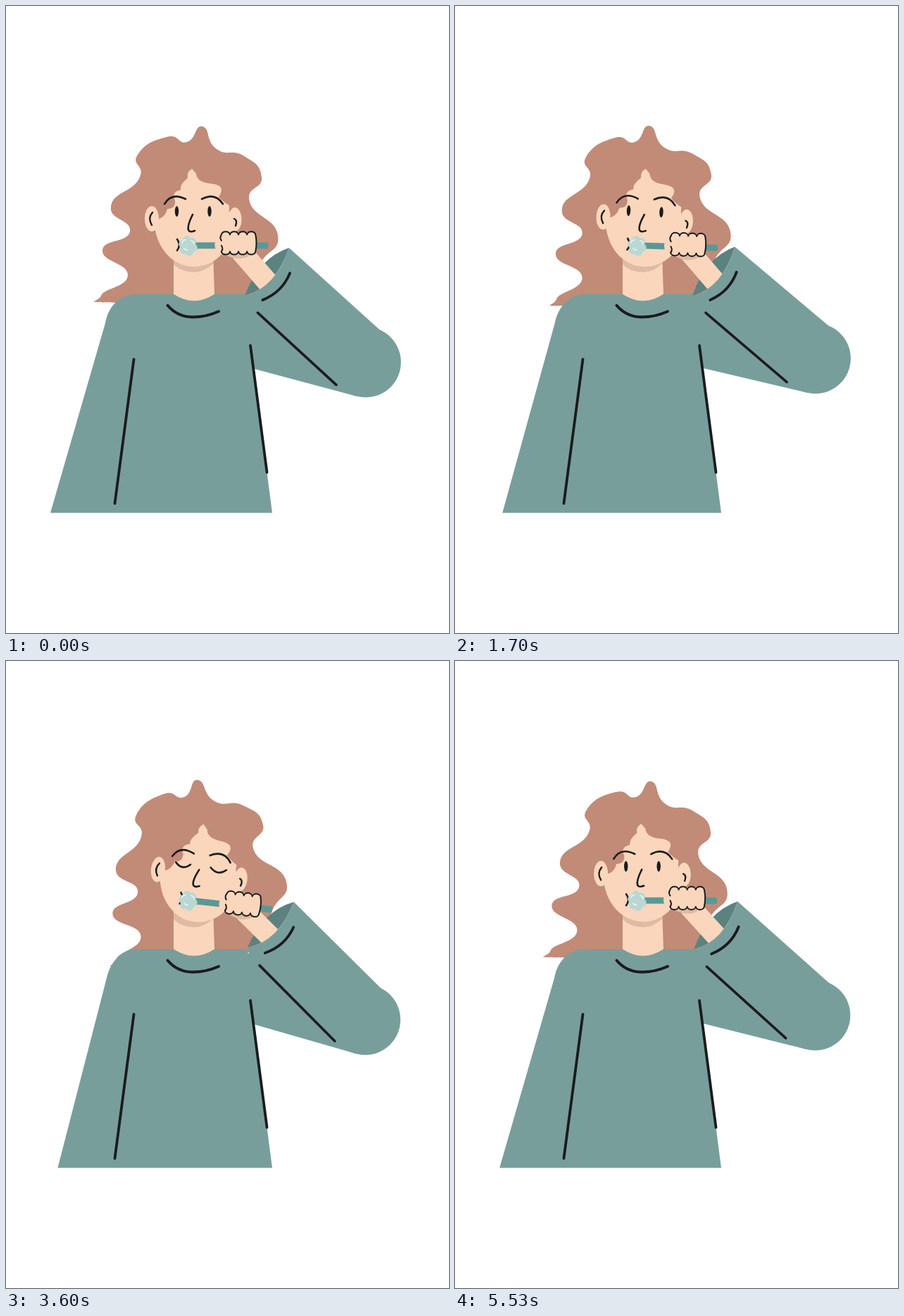
An HTML page with a canvas for the animation above (5610 ms loop, 629 px wide and 890 px high).

```html
<!DOCTYPE html>
<html lang="en">
<head>
<meta charset="utf-8">
<title>Brushing teeth</title>
<style>
  html, body { margin: 0; width: 100%; height: 100%; overflow: hidden; background: #fff; }
  canvas { display: block; }
</style>
</head>
<body>
<canvas id="stage" width="629" height="890"></canvas>
<script>
const ctx = document.getElementById('stage').getContext('2d');
const LOOP = 5610, CYCLE = 1400, TAU = 2 * Math.PI;
const INK = '#1b1b1d', HAIR = '#c18b78', SKIN = '#fad7bc', SHADE = '#dfbaa4',
      SHIRT = '#789e9c', CUFF = '#5c8280', BRUSH = '#5a9897', FOAM = '#b9d8d3', SHINE = '#e9f5f2';

// Crests and notches of the curls, clockwise from the lower left
const curls = [[160, 421], [135, 411], [173, 382], [137, 347], [176, 320], [149, 284], [189, 245],
  [187, 211], [228, 186], [257, 193], [279, 171], [299, 203], [338, 213], [363, 243], [346, 278],
  [386, 325], [360, 368], [345, 415]];

function fill(path, color) {
  ctx.fillStyle = color;
  ctx.fill(typeof path === 'string' ? new Path2D(path) : path);
}

function line(d, width, color = INK) {
  ctx.strokeStyle = color;
  ctx.lineWidth = width;
  ctx.stroke(new Path2D(d));
}

function oval(x, y, rx, ry, color) {
  const p = new Path2D();
  p.ellipse(x, y, rx, ry, 0, 0, TAU);
  fill(p, color);
}

function roundBox(x, y, w, h, r, color) {
  const p = new Path2D();
  p.roundRect(x, y, w, h, r);
  fill(p, color);
}

// Closed smooth curve through the points
function smooth(pts, bend) {
  const p = new Path2D(), at = i => pts[(i + pts.length) % pts.length];
  p.moveTo(...at(0));
  pts.forEach((b, i) => {
    const a = at(i - 1), c = at(i + 1), d = at(i + 2);
    p.bezierCurveTo(b[0] + (c[0] - a[0]) * bend, b[1] + (c[1] - a[1]) * bend,
                    c[0] - (d[0] - b[0]) * bend, c[1] - (d[1] - b[1]) * bend, ...c);
  });
  return p;
}
const hair = smooth(curls, .27);

function group(place, draw) {
  ctx.save();
  place();
  draw();
  ctx.restore();
}

function turn(x, y, deg, toX = x, toY = y) {
  ctx.translate(toX, toY);
  ctx.rotate(deg * Math.PI / 180);
  ctx.translate(-x, -y);
}

function drawHair(lean) {
  group(() => {
    ctx.translate(258, 226);
    ctx.transform(1, -.105 * lean, .125 * lean, 1, 0, 0);
    ctx.translate(-258, -226);
  }, () => fill(hair, HAIR));
}

function drawHead(closed) {
  oval(207, 302, 10, 18, SKIN);
  oval(325, 303, 9.5, 17, SKIN);
  fill('M210 304C212 345 238 370 267 370C297 370 322 345 325 304Q315 297 317 283' +
       'Q308 278 302 271Q314 254 290 252Q271 250 270 238L264 231Q256 236 258 244' +
       'Q246 254 248 261Q234 264 240 276Q241 288 229 288Q226 302 210 304Z', SKIN);
  line('M208 293Q201 301 207 311M324 302Q329 304 326 312', 2.4);
  line('M225 281Q235 264 255 274M278 274Q297 264 308 281', 2.6);
  line('M265 296Q257 312 259 318Q261 322 268 319', 2.6);
  line('M243 331Q249 339 243 347', 2.6);
  if (closed) {
    line('M231 289Q241 300 252 290M281 291Q292 302 303.5 292', 2.6);
  } else {
    oval(242.5, 291.5, 2.7, 7.5, INK);
    oval(289, 291.5, 2.7, 7.5, INK);
  }
}

function drawTorso(lean) {
  fill('M238 350L238 410L267 425L296 410L294 350Z', SKIN);
  fill('M238 358L294 358L294 366Q281 378 267 378Q250 378 238 367Z', SHADE);
  fill(`M238 409Q267 428 296 409H342L347 482L378 719.5H${63 + 11 * lean}L${141 + 2 * lean} 450` +
       `C${145 + 3 * lean} 428 ${160 + 4 * lean} 409 185 409Z`, SHIRT);
}

function drawArm(ex, ey, tilt, reach, hand) {
  const pitX = 353, pitY = 511 + 5 * reach;
  const forearm = () => turn(511, 506, tilt, ex, ey);

  // Upper arm ends on a tangent to the elbow circle
  const dx = ex - pitX, dy = ey - pitY, len = Math.hypot(dx, dy);
  const a = Math.atan2(dy, dx) + Math.asin(50 / len), run = Math.sqrt(len * len - 2500);
  fill(`M338 411L346 482L${pitX} ${pitY}l${run * Math.cos(a)} ${run * Math.sin(a)}L${ex} ${ey}Z`, SHIRT);
  oval(ex, ey, 50, 50, SHIRT);

  group(forearm, () => fill('M403 343Q360 357 340 410Q384 399 403 343Z', CUFF));

  const r = tilt * Math.PI / 180, c = Math.cos(r), s = Math.sin(r);
  line(`M${hand}L${ex - 128 * c + 102 * s} ${ey - 128 * s - 102 * c}`, 30, SKIN);

  group(forearm, () => {
    fill('M403 343Q384 399 340 411L350 440L480 547L511 506L543 471Z', SHIRT);
    line('M404 379Q393 406 365 417', 3.8);
    line('M358 435L469 538', 3.6);
  });
}

function drawFist() {
  fill('M311 353Q330 363 345 355L345 348L311 348Z', SHADE);
  oval(304, 339, 7.5, 11, SKIN);
  roundBox(304, 321, 51, 31, 7, SKIN);
  const knuckles = dir => `a6.1 5 0 0 1 ${dir * 12.1} 0`.repeat(4);
  line('M306 333Q303 329 306 324.5' + knuckles(1) + 'Q357 336 354.4 348.5' + knuckles(-1), 2);
  line('M306 340Q309 345 306 348.5', 2);
}

function drawBrush(slide) {
  ctx.fillStyle = BRUSH;
  ctx.fillRect(266, 335.5, 45 + slide, 9);
  group(() => ctx.translate(slide, 0), () => {
    roundBox(345, 335.5, 27.5, 9, 2, BRUSH);
    drawFist();
  });
}

function drawFoam() {
  oval(258.5, 340, 9, 9, FOAM);
  for (let a = .3; a < TAU; a += TAU / 6)
    oval(258.5 + 7.5 * Math.cos(a), 340.5 + 8.5 * Math.sin(a), 6, 6, FOAM);
  line('M250 336Q251 332 255 332M263 333Q267 334 267 338M253 344Q255 347 258 346', 1.6, SHINE);
}

function draw(now) {
  const p = now % LOOP % CYCLE / CYCLE;
  const lean = (1 - Math.cos(TAU * p)) / 2;
  // Three uneven brush strokes per sway: 0 = elbow raised, 1 = elbow lowered
  const beat = p + .055 + .045 * Math.sin(TAU * (p - .2));
  const reach = (.87 + .13 * lean) * (1 + Math.cos(3 * TAU * beat)) / 2;
  const dip = lean * reach, slide = 5 * reach + 6 * dip - 4.4;
  const armTilt = -7 + 7.8 * reach + 1.2 * lean - Math.sin(TAU * p);

  ctx.fillStyle = '#fff';
  ctx.fillRect(0, 0, 629, 890);
  ctx.lineCap = ctx.lineJoin = 'round';

  drawHair(lean);
  drawTorso(lean);
  group(() => turn(266, 378, 6.8 * lean), () => drawHead(p > .33 && p < .71));
  drawArm(515.5 - 5.5 * reach, 482 + 27.5 * reach, armTilt, reach, [335 + slide, 350 + 8 * dip]);
  line('M229.5 425Q243 441 264 441.5Q283 442 302 433.5', 4);
  line('M181.5 501.5L154.5 706M347 482L370.5 662', 3.8);
  group(() => turn(262, 340, 6.8 * dip), () => drawBrush(slide));
  drawFoam();
}

const start = performance.now();
function tick() {
  draw(performance.now() - start);
  requestAnimationFrame(tick);
}
tick();
</script>
</body>
</html>
```
